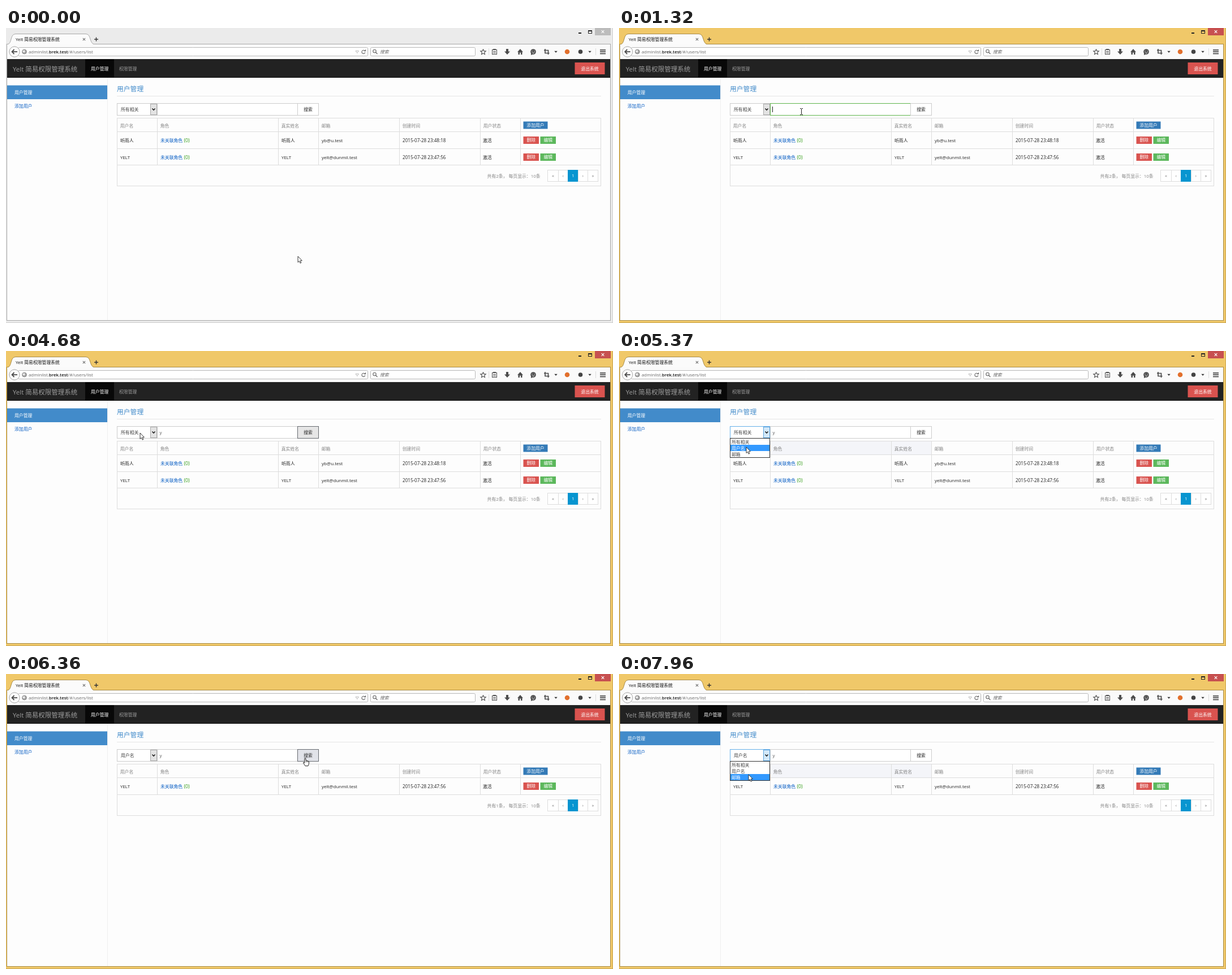
An HTML page with a canvas for the animation above (8000 ms loop, 1073x522 px).

```html
<!DOCTYPE html>
<html lang="zh">
<head>
<meta charset="utf-8">
<style>
html, body { margin: 0; width: 100%; height: 100%; overflow: hidden; background: #fdfdfd; }
canvas { display: block; width: 1073px; height: 522px; }
</style>
</head>
<body>
<canvas id="stage"></canvas>
<script>
const W = 1073, H = 522, LOOP = 8000;
const FONT = '"Open Sans", "Noto Sans CJK SC", "Noto Sans CJK", sans-serif';
const canvas = document.getElementById('stage');
const ctx = canvas.getContext('2d');
const dpr = window.devicePixelRatio || 1;
canvas.width = W * dpr;
canvas.height = H * dpr;

const BLUE = '#428bca', RED = '#d9534f', GREEN = '#5cb85c', LINK = '#0a5fc4', LINE = '#dddddd';
const MEDIUM = { style: '500' };
const OPTIONS = ['所有相关', '用户名', '邮箱'];
const COLUMNS = [196, 267, 481, 552, 695, 838, 909];
const USERS = [
  { name: '听雨人', mail: 'yb@u.test', date: '2015-07-28 23:48:18' },
  { name: 'YELT', mail: 'yelt@dunmil.test', date: '2015-07-28 23:47:56' }
];

// Pointer moves: start, end, number of steps, target x, target y
const START = [516, 404];
const MOVES = [
  [370, 1180, 7, 322, 148],
  [2730, 3250, 5, 538, 137],
  [4110, 4680, 5, 237, 145],
  [4810, 4940, 2, 230, 149],
  [5210, 5370, 2, 225, 170],
  [5680, 6090, 4, 528, 149],
  [6640, 7290, 6, 232, 148],
  [7550, 7680, 2, 230, 167],
  [7800, 7960, 2, 229, 178]
];

const during = (t, a, b) => t >= a && t < b;

function pointerAt(t) {
  let [x, y] = START;
  for (const [a, b, n, tx, ty] of MOVES) {
    if (t < a) break;
    const step = Math.min(n, Math.floor((t - a) / (b - a) * (n - 1) + 1e-6) + 1);
    const p = step / n, k = p * (2 - p);
    x += (tx - x) * k;
    y += (ty - y) * k;
  }
  return { x, y };
}

function stateAt(t) {
  const p = pointerAt(t);
  const inRow = p.y >= 133 && p.y < 155;
  const open = during(t, 4940, 5680) || t >= 7420;
  const selected = t >= 5680 ? 1 : 0;
  return {
    p, open, selected,
    active: t >= 1320,
    hidden: during(t, 1440, 2730),
    typed: t >= 2150,
    caret: during(t, 1320, 1840) || during(t, 2150, 3520),
    inputFocus: during(t, 1320, 3520),
    buttonFocus: during(t, 3520, 4810) || during(t, 6220, 7420),
    selectFocus: during(t, 4810, 6220) || t >= 7420,
    overInput: inRow && p.x >= 267 && p.x < 516,
    overButton: inRow && p.x >= 516 && p.x < 553,
    marked: p.y >= 155 ? Math.min(2, Math.floor((p.y - 155) / 11.2)) : selected,
    users: t >= 6360 ? USERS.slice(1) : USERS
  };
}

function rect(x, y, w, h, fill) {
  ctx.fillStyle = fill;
  ctx.fillRect(x, y, w, h);
}

function box(x, y, w, h, fill, border) {
  rect(x, y, w, h, border);
  rect(x + 1, y + 1, w - 2, h - 2, fill);
}

// y is the visual centre of the line; returns the right edge
function text(s, x, y, color, { size = 7.85, align = 'left', style = '' } = {}) {
  ctx.font = `${style} ${size}px ${FONT}`;
  ctx.textAlign = align;
  ctx.fillStyle = color;
  ctx.fillText(s, x, y + size * 0.37);
  return x + ctx.measureText(s).width;
}

function shape(points, fill, stroke, width = 1) {
  ctx.beginPath();
  points.forEach(([x, y], i) => i ? ctx.lineTo(x, y) : ctx.moveTo(x, y));
  if (fill) {
    ctx.closePath();
    ctx.fillStyle = fill;
    ctx.fill();
  }
  if (stroke) {
    ctx.strokeStyle = stroke;
    ctx.lineWidth = width;
    ctx.stroke();
  }
}

function circle(x, y, r, fill, stroke, width = 1, a = 0, b = Math.PI * 2) {
  ctx.beginPath();
  ctx.arc(x, y, r, a, b);
  if (fill) { ctx.fillStyle = fill; ctx.fill(); }
  if (stroke) { ctx.strokeStyle = stroke; ctx.lineWidth = width; ctx.stroke(); }
}

function rounded(x, y, w, h, r, fill, stroke) {
  ctx.beginPath();
  ctx.roundRect(x + .5, y + .5, w - 1, h - 1, r);
  ctx.fillStyle = fill;
  ctx.fill();
  ctx.strokeStyle = stroke;
  ctx.lineWidth = 1;
  ctx.stroke();
}

function cross(x, y, r, color, width) {
  shape([[x - r, y - r], [x + r, y + r]], null, color, width);
  shape([[x - r, y + r], [x + r, y - r]], null, color, width);
}

const triangle = (x, y, r, color) =>
  shape([[x - r, y - r / 2], [x + r, y - r / 2], [x, y + r / 2 + .5]], color);

function drawFrame(active) {
  const edge = active ? '#a98c48' : '#a9a9a9';
  rect(0, 0, W, H, active ? '#f0c869' : '#ebebeb');
  rect(W - 1, 0, 1, H, active ? '#c9a654' : '#d0d0d0');
  rect(0, H - 1, W, 1, active ? '#c9a654' : '#d0d0d0');
  box(1, 28, 1068, 490, '#fdfdfd', edge);

  ctx.beginPath();
  ctx.moveTo(3, 29);
  ctx.bezierCurveTo(11, 27, 7, 10.5, 17, 10.5);
  ctx.lineTo(141, 10.5);
  ctx.bezierCurveTo(151, 10.5, 147, 27, 156, 29);
  ctx.fillStyle = '#fbfbfb';
  ctx.fill();
  ctx.strokeStyle = edge;
  ctx.lineWidth = 1;
  ctx.stroke();
  rect(2, 29, 1066, 26, '#fafafa');
  text('Yelt 简易权限管理系统', 17, 20, '#111');
  cross(138, 20, 2.2, '#777', 1.2);
  rect(156, 19.3, 7, 1.4, '#333');
  rect(158.8, 16.5, 1.4, 7, '#333');

  rect(1012, 8, 5, 2, '#222');
  box(1029, 4, 7, 6, active ? '#f0c869' : '#ebebeb', '#222');
  rect(1029, 4, 7, 2, '#222');
  rect(1041, 0, 28, 13, active ? '#c75050' : '#bcbcbc');
  cross(1055, 6.5, 2.3, '#fff', 1.2);
}

function drawToolbar() {
  const ink = '#4d4d4d';
  rounded(21, 34, 619, 16, 2, '#fff', '#b9b9b9');
  circle(15, 42, 9.2, '#fbfbfb', '#a5a5a5');
  shape([[20, 42], [11, 42]], null, ink, 1.8);
  shape([[14.5, 38], [10.5, 42], [14.5, 46]], null, ink, 1.8);

  circle(32.5, 42, 4, '#a0a0a0', '#8a8a8a', .8);
  shape([[29, 41], [32, 39], [34, 41], [32, 44]], '#eee');
  let x = text('adminlist.', 40, 42.3, '#666');
  x = text('brek.test', x, 42.3, '#111', { style: '600' });
  text('/#/users/list', x, 42.3, '#666');
  shape([[618, 40.5], [623.5, 40.5], [620.8, 44.5], [618, 40.5]], null, '#aaa', .8);
  circle(632, 42.3, 3, null, '#666', 1.1, .3, 5.3);
  shape([[632.5, 41.3], [636, 41.3], [636, 37.8]], '#666');

  rounded(644, 34, 186, 16, 2, '#fff', '#b9b9b9');
  circle(651.5, 41, 2.7, null, '#666', 1.1);
  shape([[653.5, 43], [656.5, 46]], null, '#666', 1.3);
  text('搜索', 661, 42.3, '#666', { style: 'italic' });

  const star = Array.from({ length: 11 }, (_, i) => {
    const r = i % 2 ? 2.3 : 5, a = i * Math.PI / 5 - Math.PI / 2;
    return [843.5 + r * Math.cos(a), 42.5 + r * Math.sin(a)];
  });
  shape(star, null, ink, 1.1);
  rect(853, 36, 1, 12, '#ddd');
  box(859, 38, 9, 9, '#fafafa', ink);
  rect(861, 37, 5, 2, ink);
  for (const y of [41, 43.5]) rect(861, y, 5, 1, ink);
  rect(884, 37, 4, 5, ink);
  shape([[881, 41.5], [891, 41.5], [886, 47]], ink);
  shape([[904, 42.5], [909, 37], [914, 42.5], [912.5, 42.5], [912.5, 47], [905.5, 47], [905.5, 42.5]], ink);
  rect(908, 43.5, 2, 3.5, '#fafafa');
  circle(932, 42, 4.8, ink);
  shape([[928, 44], [928, 48], [932, 46]], ink);
  circle(930, 41, .7, '#fafafa');
  circle(934, 41, .7, '#fafafa');
  circle(932, 42.5, 2, null, '#fafafa', .9, .2, 2.9);
  shape([[953, 37], [953, 44.5], [960.5, 44.5]], null, ink, 1.7);
  shape([[951, 39.5], [958.5, 39.5], [958.5, 47]], null, ink, 1.7);
  triangle(972, 42, 2.7, '#333');
  circle(992, 42, 4.3, '#e2702d');
  circle(1015.5, 42, 3.8, '#444');
  triangle(1032, 42, 2.7, '#333');
  rect(1042, 36, 1, 12, '#ddd');
  for (const y of [38, 41, 44.5]) rect(1050, y, 10, 1.8, ink);
}

function drawPage() {
  rect(2, 55, 1066, 33, '#222');
  rect(2, 87, 1066, 1, '#0c0c0c');
  text('Yelt 简易权限管理系统', 12, 72.5, '#9d9d9d', { size: 11.5 });
  rect(140, 55, 51, 33, '#080808');
  text('用户管理', 150, 72, '#fff', MEDIUM);
  text('权限管理', 200, 72, '#9d9d9d');
  rect(1005.5, 61, 53, 21, RED);
  text('退出系统', 1032, 72, '#fff', { align: 'center', style: '500' });

  rect(179, 88, 1, 429, '#eee');
  rect(2, 101.5, 177, 24.5, BLUE);
  text('用户管理', 15, 114, '#fff', MEDIUM);
  text('添加用户', 15, 138, LINK, MEDIUM);
  text('用户管理', 196, 108, BLUE, { size: 11.8 });
  rect(196, 120, 856, 1, '#e5e5e5');
}

function drawSearch(s) {
  const hot = s.overButton || s.buttonFocus;
  box(196, 133, 72, 22, '#fff', s.selectFocus ? '#66afe9' : '#ccc');
  text(OPTIONS[s.selected], 203, 144.3, '#444');
  box(255, 134, 12, 20, s.open ? '#d3e9fa' : '#e3e3e3', s.open ? '#5ba3dc' : '#aaa');
  shape([[258.5, 142.5], [261, 145.2], [263.5, 142.5]], null, '#111', 1.4);

  box(267, 133, 249, 22, '#fff', s.inputFocus ? '#5fb54c' : '#ccc');
  if (s.typed) text('y', 271.5, 144, '#555');
  if (s.caret) rect(s.typed ? 275 : 271, 139, 1, 10, '#222');

  const border = s.buttonFocus ? '#666a70' : s.overButton ? '#adadad' : '#ccc';
  const fill = s.buttonFocus && s.overButton ? '#e1e3e9' : hot ? '#e6e6e6' : '#fff';
  box(515, 133, 38, 22, fill, border);
  text('搜索', 534, 144.3, '#222', { align: 'center', style: '500' });
}

function label(s, x, y, w, fill) {
  rect(x, y, w, 13, fill);
  text(s, x + w / 2, y + 6.5, '#fff', { align: 'center', style: '500' });
}

function drawTable(s) {
  const rows = s.users.length, foot = 184 + Math.round(rows * 29.5);
  const bottom = foot + 37;
  box(196, 159, 856, bottom - 159, '#fdfdfd', LINE);
  if (s.open) rect(197, 160, 355, 23, '#f4f5f9');
  for (const x of COLUMNS.slice(1)) rect(x, 160, 1, foot - 160, LINE);

  ['用户名', '角色', '真实姓名', '邮箱', '创建时间', '用户状态'].forEach((name, i) =>
    text(name, COLUMNS[i] + 5.7, 173.5, '#858585'));
  label('添加用户', 914.5, 165.5, 43, '#337ab7');

  s.users.forEach((user, i) => {
    const y = 199 + i * 30;
    rect(196, Math.round(183 + i * 29.5), 856, 1, LINE);
    text(user.name, 202, y, '#222');
    text('未关联角色', 273, y, LINK, MEDIUM);
    text('(0)', 314.5, y, '#2f9a12', { size: 8.7 });
    text(user.name, 487, y, '#222');
    text(user.mail, 558, y, '#222', { size: 8 });
    text(user.date, 701, y, '#222', { size: 8.1 });
    text('激活', 843, y, '#222');
    label('删除', 914.5, y - 7, 27.5, RED);
    label('编辑', 944.5, y - 7, 27.5, GREEN);
  });
  rect(196, foot - 1, 856, 1, LINE);

  const y = foot + 8;
  text(`共有${rows}条， 每页显示：10条`, 944.5, y + 11, '#858585', { align: 'right' });
  box(957, y, 90, 21, '#fff', LINE);
  '«‹1›»'.split('').forEach((c, i) => {
    const x = 958 + i * 17.6;
    if (i) rect(Math.round(x), y, 1, 20, LINE);
    if (c === '1') rect(993, y, 18, 21, '#0795d0');
    text(c, x + 9, y + 10.5, c === '1' ? '#fff' : '#777', { align: 'center' });
  });
}

function drawOptions(s) {
  box(196, 154, 71, 35, '#fff', '#333');
  OPTIONS.forEach((name, i) => {
    const y = 155 + i * 11, on = i === s.marked;
    if (on) rect(197, y, 69, 11, '#3399ff');
    text(name, 199, y + 5.7, on ? '#fff' : '#444');
  });
}

function drawArrow(x, y) {
  shape([[0, 0], [0, 10.6], [2.4, 8.4], [4.1, 12.2], [5.8, 11.4], [4.2, 7.8], [7.3, 7.6], [0, 0]]
    .map(([a, b]) => [x + a, y + b]), '#fff', '#222', .9);
}

function drawBeam(x, y) {
  rect(x, y - 5, 1, 10, '#222');
  for (const dy of [-6, 5]) {
    rect(x - 2, y + dy, 2, 1, '#222');
    rect(x + 1, y + dy, 2, 1, '#222');
  }
}

function drawHand(x, y) {
  ctx.save();
  ctx.translate(x, y);
  ctx.lineJoin = 'round';
  shape([[.2, 0], [1.7, 0], [2.2, 4.4], [4, 4.3], [5.6, 5], [7.2, 5.6], [7.6, 7], [7.2, 10.5],
    [6, 13.7], [1, 13.7], [-.8, 10.8], [-2.7, 8.2], [-2, 7.1], [-.2, 8.6], [-.2, .6], [.2, 0]], '#fff', '#222', 1);
  for (const dx of [2.2, 4, 5.7]) shape([[dx, 4.8], [dx, 7.2]], null, '#222', .7);
  ctx.restore();
}

function drawPointer(s) {
  if (s.hidden) return;
  const x = Math.round(s.p.x), y = Math.round(s.p.y);
  if (s.overButton) drawHand(x, y);
  else if (s.overInput) drawBeam(x, y);
  else drawArrow(x, y);
}

function draw(t) {
  const s = stateAt(t);
  ctx.setTransform(dpr, 0, 0, dpr, 0, 0);
  drawFrame(s.active);
  drawToolbar();
  drawPage();
  drawSearch(s);
  drawTable(s);
  if (s.open) drawOptions(s);
  drawPointer(s);
}

const begin = performance.now();
function tick() {
  draw((performance.now() - begin) % LOOP);
  requestAnimationFrame(tick);
}
tick();
</script>
</body>
</html>
```
